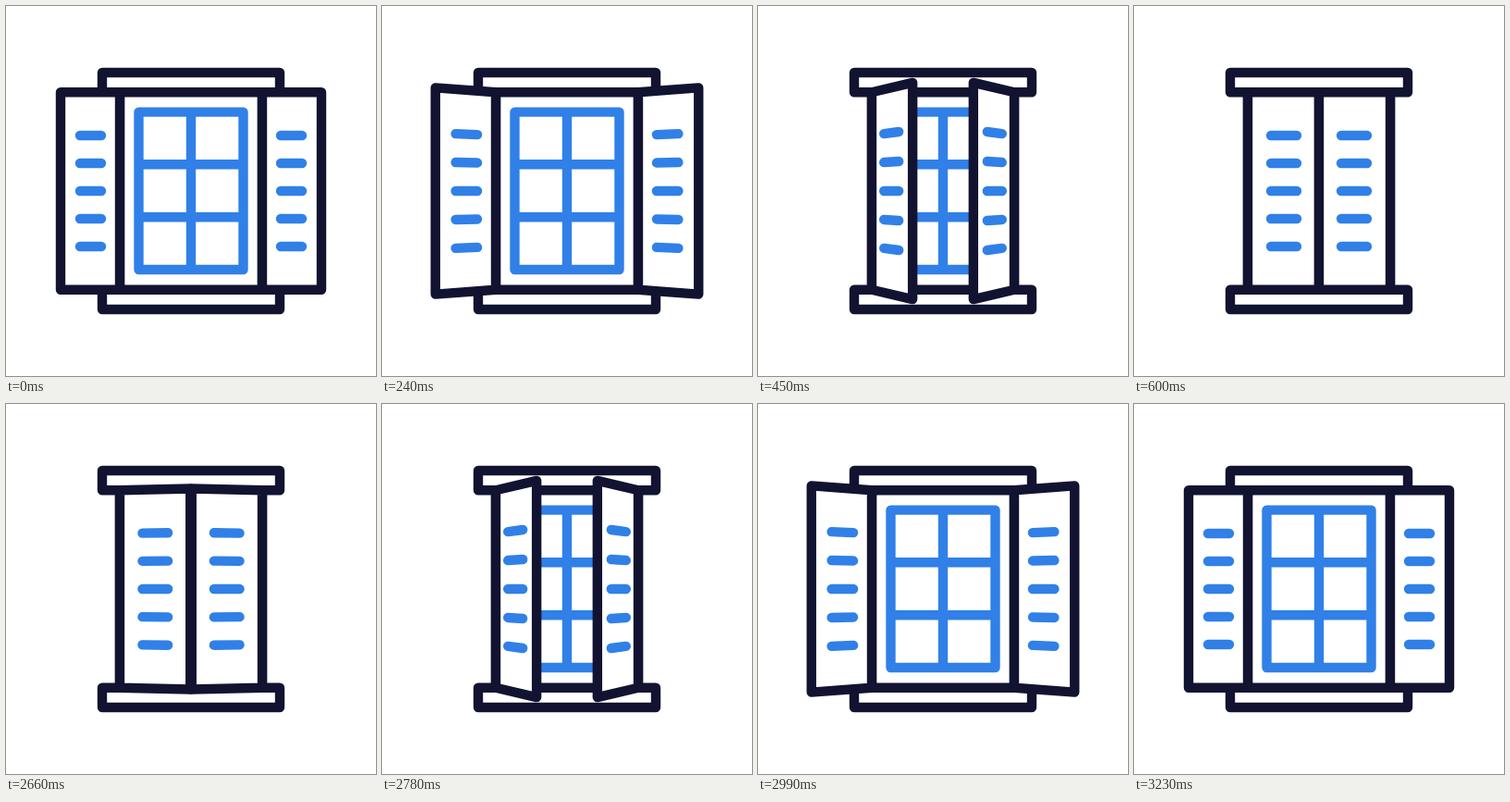
An HTML page that plays this animation: 400x400 px, repeating every 8260 ms.

```html
<!DOCTYPE html>
<html lang="en">
<head>
<meta charset="utf-8">
<title>Window shutters</title>
<style>
  html, body { margin: 0; width: 100%; height: 100%; overflow: hidden; background: #fff; }
  svg { display: block; width: 100%; height: 100%; }
  path { fill: none; stroke: #121331; stroke-width: 10.4; stroke-linecap: round; stroke-linejoin: round; }
  .blue { stroke: #3080e8; }
  .panel { fill: #fff; }
</style>
</head>
<body>
<svg viewBox="0 0 400 400">
  <path d="M104 72H296V93.3H104ZM104 306.7H296V328H104ZM123 93.3V306.7M277 93.3V306.7"/>
  <path class="blue" d="M143.5 114.6H256.5V285H143.5ZM200 114.6V285M143.5 171.2H256.5M143.5 228.2H256.5"/>
  <g id="left"><path class="panel"/><path class="blue"/></g>
  <g id="right" transform="matrix(-1 0 0 1 400 0)"><path class="panel"/><path class="blue"/></g>
</svg>
<script>
const LOOP = 8260, STEP = 30, STEPS = 20, OPEN_AT = 2630;
const HALF_W = 77, HALF_H = 106.7;
const panels = document.querySelectorAll('.panel');
const slats = document.querySelectorAll('g .blue');

const clamp = v => Math.min(1, Math.max(0, v));
const mix = (a, b, k) => a + (b - a) * k;
const bezier = (a, b, s) => 3 * a * s * (1 - s) ** 2 + 3 * b * s * s * (1 - s) + s ** 3;

// cubic-bezier(.656, 0, .61, .8)
function ease(x) {
  if (x <= 0 || x >= 1) return clamp(x);
  let lo = 0, hi = 1;
  for (let i = 0; i < 30; i++) {
    const s = (lo + hi) / 2;
    if (bezier(.656, .61, s) < x) lo = s; else hi = s;
  }
  return bezier(0, .8, lo);
}

const progress = (t, start) => clamp(Math.floor((t - start) / STEP) / STEPS);

// q: 0 = folded back, 1 = shut
function draw(q) {
  const angle = q * Math.PI;
  const reach = mix(64, 77, q) * Math.cos(angle);
  const zoom = (11 + 9.5 * q ** 4) * Math.sin(angle) / HALF_H;
  const point = (f, y) => {
    const s = 1 + f * zoom;
    return (200 - (HALF_W + f * reach) * s).toFixed(2) + ' ' + (200 + y * s).toFixed(2);
  };
  const panel = `M${point(0, -HALF_H)}L${point(1, -HALF_H)}L${point(1, HALF_H)}L${point(0, HALF_H)}Z`;
  const near = mix(.3125, .325, q), far = mix(.672, .688, q);
  const lines = [-60, -30, 0, 30, 60].map(y => `M${point(near, y)}L${point(far, y)}`).join('');
  panels.forEach(p => p.setAttribute('d', panel));
  slats.forEach(p => p.setAttribute('d', lines));
}

const begin = performance.now();
function tick() {
  const t = (performance.now() - begin) % LOOP;
  draw(ease(t < OPEN_AT ? progress(t, 0) : 1 - progress(t, OPEN_AT)));
  requestAnimationFrame(tick);
}
tick();
</script>
</body>
</html>
```
